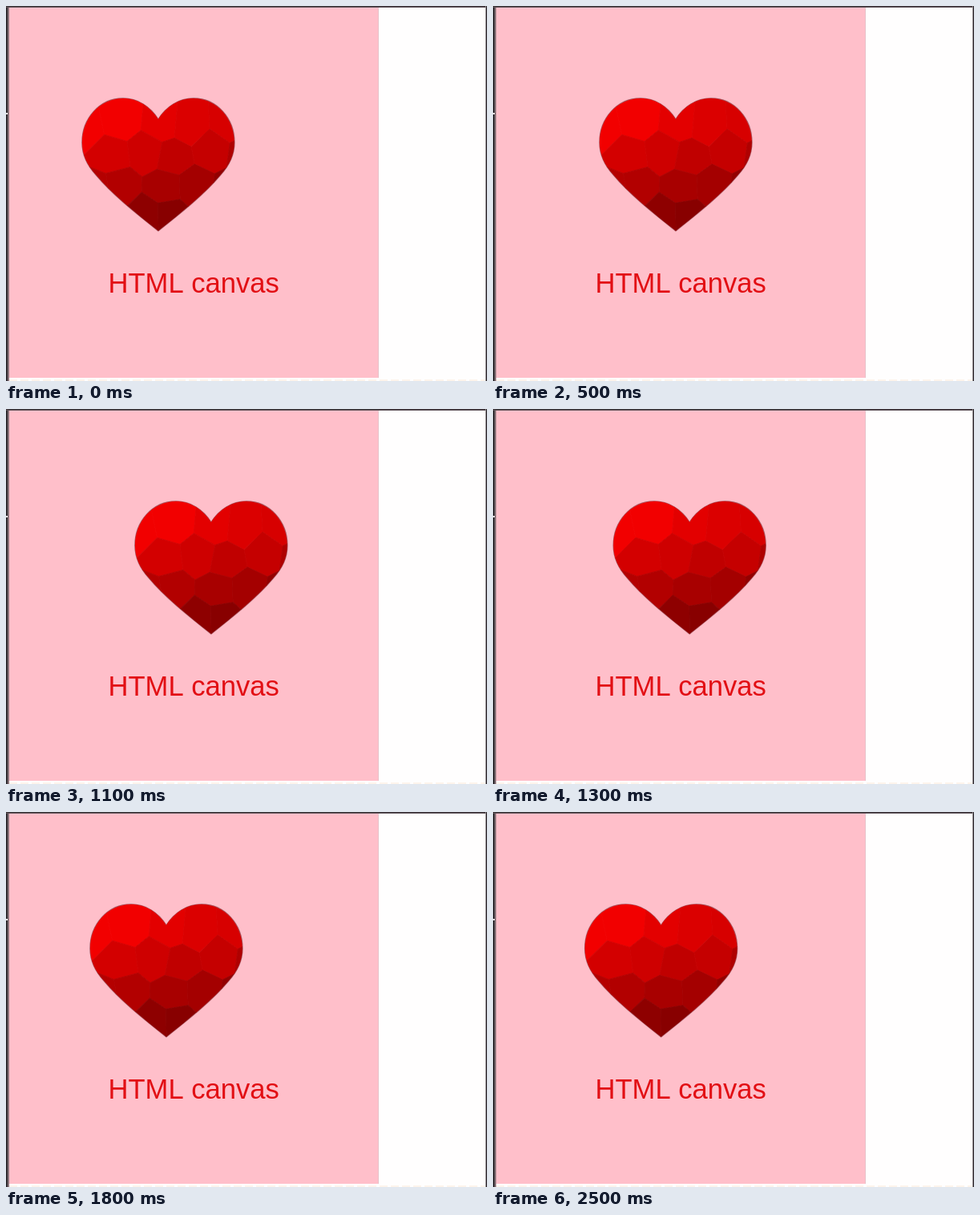
Animation of 600x467 px, one loop 2600 ms. Source, as an HTML page with a canvas:

```html
<!DOCTYPE html>
<html lang="en">
<head>
<meta charset="utf-8">
<title>HTML canvas</title>
<style>
  html, body { margin: 0; width: 100%; height: 100%; overflow: hidden; background: #fffefe; }
  canvas { display: block; }
</style>
</head>
<body>
<canvas id="stage" width="600" height="467"></canvas>
<script>
const ctx = document.getElementById('stage').getContext('2d');
const LOOP = 2600, STEP = 100;
const MID = 223, SWING = 34.4, SPEED = 0.00287, PHASE = 0.28;

// The heart around its vertical axis
const heart = new Path2D(
  'M0 141C-10 125-26 115-44 115C-73 115-95 140-95 170C-95 186-88 199-78 210' +
  'C-57 235-29 257 0 280C29 257 57 235 78 210C88 199 95 186 95 170' +
  'C95 140 73 115 44 115C26 115 10 125 0 141Z');

let seed = 7;
function jitter(range) {
  seed = seed * 16807 % 2147483647;
  return (seed / 2147483647 * 2 - 1) * range;
}

// Facet centres on a staggered, jittered grid
function makeSites() {
  const sites = [];
  for (let row = 0; row < 4; row++) {
    for (let col = -2; col <= 2; col++) {
      const x = col * 42 + (row % 2) * 21 + jitter(10);
      sites.push([x, 146 + row * 39 + jitter(7)]);
    }
  }
  return sites;
}

// Light falls from the upper left
function shade([x, y]) {
  const red = 245 - (y - 130) * 0.8 - x * 0.2 + jitter(5);
  return `rgb(${Math.min(242, Math.round(red))},0,0)`;
}

// Keep the part of a polygon that is nearer to a than to b
function nearer(poly, a, b) {
  const dx = b[0] - a[0], dy = b[1] - a[1];
  const side = p => (p[0] - (a[0] + b[0]) / 2) * dx + (p[1] - (a[1] + b[1]) / 2) * dy;
  const out = [];
  poly.forEach((p, i) => {
    const q = poly[(i + 1) % poly.length];
    const s = side(p), t = side(q);
    if (s <= 0) out.push(p);
    if (s * t < 0) {
      const k = s / (s - t);
      out.push([p[0] + (q[0] - p[0]) * k, p[1] + (q[1] - p[1]) * k]);
    }
  });
  return out;
}

const facets = makeSites().map((site, i, sites) => {
  let poly = [[-100, 110], [100, 110], [100, 285], [-100, 285]];
  for (const other of sites) if (other !== site) poly = nearer(poly, site, other);
  const path = new Path2D();
  poly.forEach(p => path.lineTo(p[0], p[1]));
  path.closePath();
  return { path, color: shade(site) };
});

function rect(color, x, y, w, h) {
  ctx.fillStyle = color;
  ctx.fillRect(x, y, w, h);
}

function drawPage() {
  rect('#fffefe', 0, 0, 600, 467);
  rect('#ffbfca', 4, 2, 461, 461);
  rect('#e6c3ca', 464, 2, 1, 461);
  for (let x = 4; x < 598; x += 14) rect('#fdf4ec', x, 465, 10, 2);
  rect('#2f2b30', 0, 0, 2, 467);
  rect('#8a7379', 2, 0, 2, 467);
  rect('#3b3338', 0, 0, 600, 1);
  rect('#5e5258', 0, 1, 600, 1);
  rect('#8a8488', 598, 0, 1, 467);
  rect('#2f2b30', 599, 0, 1, 467);
  rect('#fffefe', 0, 133, 2, 2);
}

function drawHeart(x) {
  ctx.save();
  ctx.translate(x, 0);
  ctx.lineWidth = 1.4;
  ctx.strokeStyle = 'rgba(110,20,30,0.6)';
  ctx.stroke(heart);
  ctx.clip(heart);
  ctx.lineWidth = 0.8;
  for (const { path, color } of facets) {
    ctx.fillStyle = ctx.strokeStyle = color;
    ctx.fill(path);
    ctx.stroke(path);
  }
  ctx.restore();
}

function drawLabel() {
  ctx.font = '34.6px "Liberation Sans", Arial, sans-serif';
  ctx.fillStyle = '#e20f14';
  ctx.fillText('HTML canvas', 127.5, 357);
}

const start = performance.now();
function frame() {
  const t = (performance.now() - start) % LOOP;
  const tick = Math.floor(t / STEP) * STEP;
  drawPage();
  drawHeart(MID - SWING * Math.cos(PHASE + SPEED * tick));
  drawLabel();
  requestAnimationFrame(frame);
}
frame();
</script>
</body>
</html>
```
